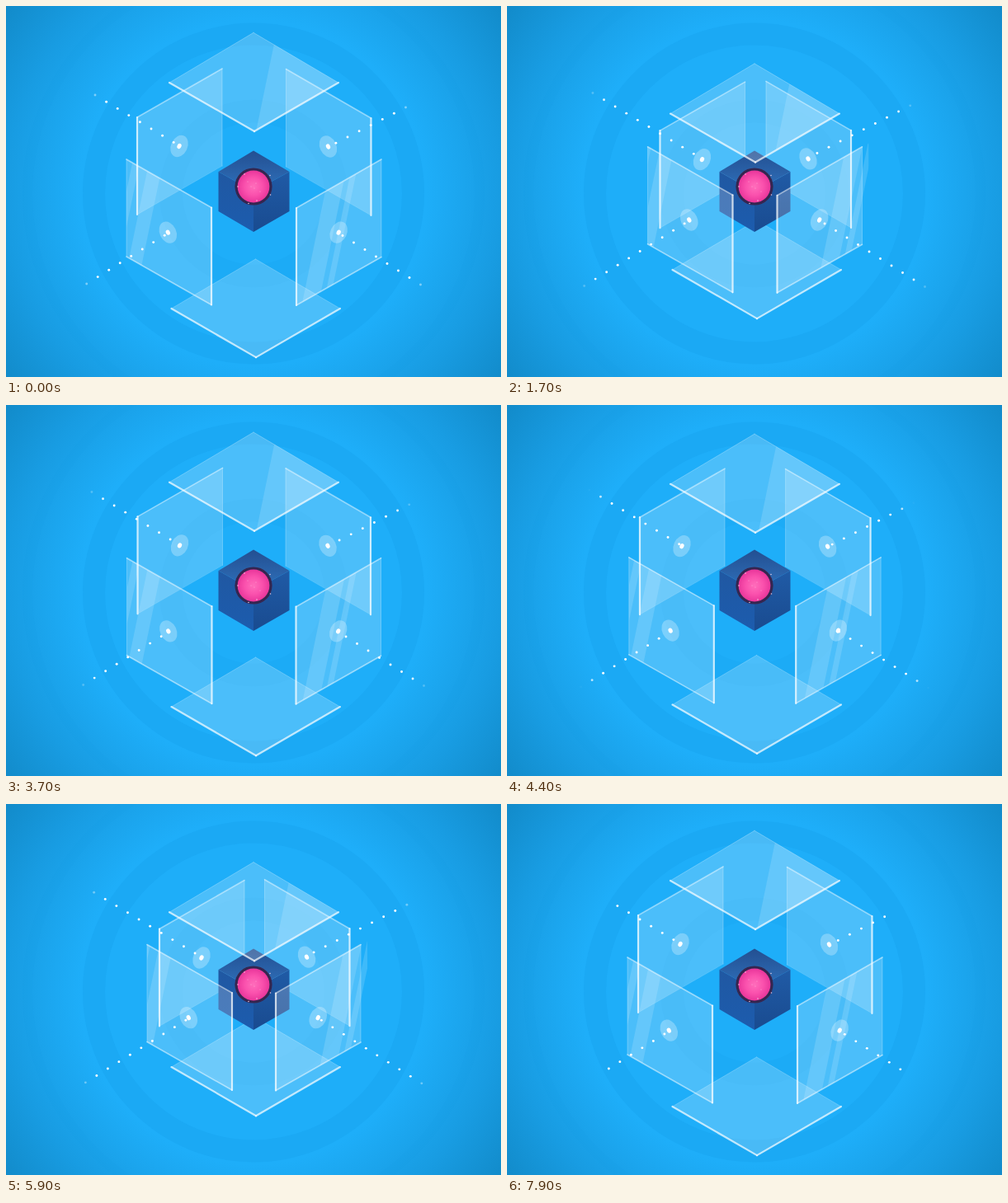
An HTML page for the animation above (8 s loop, 600 by 450 pixels).

```html
<!DOCTYPE html>
<html lang="en">
<head>
<meta charset="utf-8">
<title>Glass cube</title>
<style>
html, body { margin: 0; width: 100%; height: 100%; overflow: hidden; background: #1eaef9; }
svg { display: block; width: 100vw; height: 100vh; }
</style>
</head>
<body>
<svg id="stage" viewBox="0 0 600 450">
  <defs>
    <radialGradient id="sky" gradientUnits="userSpaceOnUse" cx="300" cy="227" r="375">
      <stop offset="0" stop-color="#1eaef9"/>
      <stop offset=".56" stop-color="#1eaef9"/>
      <stop offset=".8" stop-color="#189ce2"/>
      <stop offset="1" stop-color="#128bca"/>
    </radialGradient>
    <radialGradient id="core">
      <stop offset="0" stop-color="#ff6dbb"/>
      <stop offset=".55" stop-color="#fa51ad"/>
      <stop offset="1" stop-color="#e9369b"/>
    </radialGradient>
    <linearGradient id="leftFace" x1="0" y1="0" x2="0" y2="1">
      <stop offset="0" stop-color="#2058a2"/>
      <stop offset="1" stop-color="#1c5cae"/>
    </linearGradient>
    <linearGradient id="rightFace" x1="0" y1="0" x2="0" y2="1">
      <stop offset="0" stop-color="#205ba6"/>
      <stop offset="1" stop-color="#194b90"/>
    </linearGradient>
    <linearGradient id="topFace" x1="0" y1="0" x2="0" y2="1">
      <stop offset="0" stop-color="#234f91"/>
      <stop offset="1" stop-color="#2f72bd"/>
    </linearGradient>
  </defs>
  <rect width="600" height="450" fill="url(#sky)"/>
  <g fill="none" stroke="#0d86d2">
    <circle cx="300" cy="227.5" r="100" stroke-width="28" stroke-opacity=".07"/>
    <circle cx="300" cy="227.5" r="193.5" stroke-width="27" stroke-opacity=".13"/>
    <circle cx="300" cy="227.5" r="274" stroke-width="12" stroke-opacity=".05"/>
  </g>
  <g id="back"></g>
  <g id="cube">
    <path d="M257.5 201L300 225V274L257.5 249Z" fill="url(#leftFace)"/>
    <path d="M343.5 201L300 225V274L343.5 249Z" fill="url(#rightFace)"/>
    <path d="M300 175.5L343.5 201L300 225L257.5 201Z" fill="url(#topFace)"/>
    <circle cx="300" cy="219" r="22.6" fill="#352650"/>
    <circle cx="300" cy="219" r="19.4" fill="url(#core)"/>
  </g>
  <g id="front"></g>
  <g id="streams" fill="#fff"></g>
</svg>
<script>
const LOOP = 8000, SWING = 2000, GAP = 1000, SPAWN = 350, FADE = 1500, LAST = 5;
const $ = id => document.getElementById(id);

function add(parent, tag, attrs) {
  const el = document.createElementNS('http://www.w3.org/2000/svg', tag);
  for (const k in attrs) el.setAttribute(k, attrs[k]);
  parent.appendChild(el);
  return el;
}

const path = pts => 'M' + pts.map(p => p.join(' ')).join('L');

// pts: corners; move: travel inwards; edges: stroke alpha per side;
// hub: marker centre and tilt; shine: bands at the top of the pane, slide: their drift
const PANES = [
  { layer: 'back', pts: [[159, 135], [262, 76], [262, 194], [159, 253]], move: [27, 16.5],
    edges: [.45, .25, .12, .75], hub: [210, 170, 25] },
  { layer: 'back', pts: [[339.5, 76.5], [442.5, 136], [442.5, 254], [339.5, 195]], move: [-26, 15.2],
    edges: [.45, .75, .12, .25], hub: [390.5, 170.5, -25] },
  { layer: 'back', pts: [[302.5, 307], [405, 367], [303, 426.2], [200.5, 367]], move: [0, -48],
    edges: [.22, .7, .7, .22] },
  { layer: 'front', pts: [[300, 32.3], [403, 93], [301, 152], [198, 93]], move: [0, 38.3],
    edges: [.25, .7, .7, .25], shine: [[327.8, 460]], slide: 20 },
  { layer: 'front', pts: [[146, 186], [249, 244.5], [249, 362.5], [146, 304]], move: [25, -15.5],
    edges: [.5, .75, .5, .25], hub: [196.3, 274.7, -25], shine: [[154, 163], [174, 191]], slide: -13 },
  { layer: 'front', pts: [[455, 186], [352, 245], [352, 363], [455, 304.5]], move: [-25, -15.5],
    edges: [.5, .75, .5, .25], hub: [403.2, 274.7, 25], shine: [[395, 415], [421, 428]], slide: 41, spill: 8 }
];

// at: place of the newest dot at time 0; step: travel per second
const STREAMS = [
  { at: [108, 108], step: [13.6, 8.2], pane: 0 },
  { at: [484.5, 123], step: [-14.1, 7.2], pane: 1 },
  { at: [97.7, 337], step: [13.5, -8.4], pane: 4 },
  { at: [502.5, 338], step: [-13.5, -8.5], pane: 5 }
];

PANES.forEach((pane, i) => {
  const { pts, hub, shine, spill } = pane;
  const g = pane.g = add($(pane.layer), 'g', {});
  add(g, 'path', { d: path(pts) + 'Z', fill: '#fff', 'fill-opacity': .2 });
  if (shine) {
    const clip = add(g, 'clipPath', { id: 'clip' + i });
    const outline = spill
      ? pts.map(([x, y], k) => k % 3 ? [x, y] : [x + spill, y - spill * .57])
      : pts;
    add(clip, 'path', { d: path(outline) + 'Z' });
    const box = add(g, 'g', { 'clip-path': `url(#clip${i})` });
    pane.bands = add(box, 'g', { fill: '#fff', 'fill-opacity': .14 });
    const top = pts[0][1] - 6, h = 190, lean = -.2 * h;
    for (const [a, b] of shine) {
      add(pane.bands, 'path', {
        d: path([[a + 1.2, top], [b + 1.2, top], [b + lean, top + h], [a + lean, top + h]]) + 'Z'
      });
    }
  }
  pane.edges.forEach((alpha, k) => add(g, 'path', {
    d: path([pts[k], pts[(k + 1) % 4]]),
    stroke: '#fff', 'stroke-opacity': alpha, 'stroke-linecap': 'round',
    'stroke-width': alpha > .6 ? 2.2 : alpha > .4 ? 1.6 : 1
  }));
  if (hub) {
    const [x, y, tilt] = hub;
    const mark = add(g, 'g', { transform: `translate(${x} ${y}) rotate(${tilt})`, fill: '#fff' });
    add(mark, 'ellipse', { rx: 10, ry: 13.7, 'fill-opacity': .27 });
    add(mark, 'ellipse', { rx: 2.5, ry: 3.2 });
  }
});

// specks on the rim and the core
[[289, 204], [320, 205.5], [281, 219], [294, 239.5], [304, 236], [320.5, 229]].forEach(([x, y]) =>
  add($('cube'), 'circle', { cx: x, cy: y, r: .8, fill: '#ffd9ee', 'fill-opacity': .85 }));
[[297, 219], [301, 221], [303, 215], [293, 213], [308, 225]].forEach(([x, y]) =>
  add($('cube'), 'circle', { cx: x, cy: y, r: .6, fill: '#ffc2e2', 'fill-opacity': .7 }));

for (const s of STREAMS) {
  s.dots = Array.from({ length: 14 }, () => add($('streams'), 'circle', { r: 1.45 }));
}

// cubic-bezier(.55, 0, .45, 1)
function ease(x) {
  let lo = 0, hi = 1;
  for (let i = 0; i < 24; i++) {
    const s = (lo + hi) / 2, r = 1 - s;
    if (1.65 * s * r * r + 1.35 * s * s * r + s * s * s < x) lo = s; else hi = s;
  }
  return lo * lo * (3 - 2 * lo);
}

function draw(t) {
  const u = ((t + 50) % (2 * SWING)) / SWING;
  const p = ease(u > 1 ? 2 - u : u);

  for (const { g, move, bands, slide } of PANES) {
    g.setAttribute('transform', `translate(${move[0] * p} ${move[1] * p})`);
    if (bands) bands.setAttribute('transform', `translate(${slide * p} 0)`);
  }

  const newest = Math.min(LAST, Math.floor((t - SPAWN) / GAP));
  for (const { at, step, pane, dots } of STREAMS) {
    const { hub, move } = PANES[pane];
    const end = hub[0] + move[0] * p;
    dots.forEach((dot, i) => {
      const age = t - SPAWN - (newest - i) * GAP;
      const k = (age - (GAP - SPAWN)) / GAP;
      const x = at[0] + step[0] * k;
      const arrived = (end - x) * step[0] <= 0;
      dot.setAttribute('cx', x);
      dot.setAttribute('cy', at[1] + step[1] * k);
      dot.setAttribute('opacity', arrived ? 0 : Math.min(1, age / FADE));
    });
  }
}

function tick() {
  draw(performance.now() % LOOP);
  requestAnimationFrame(tick);
}
tick();
</script>
</body>
</html>
```
